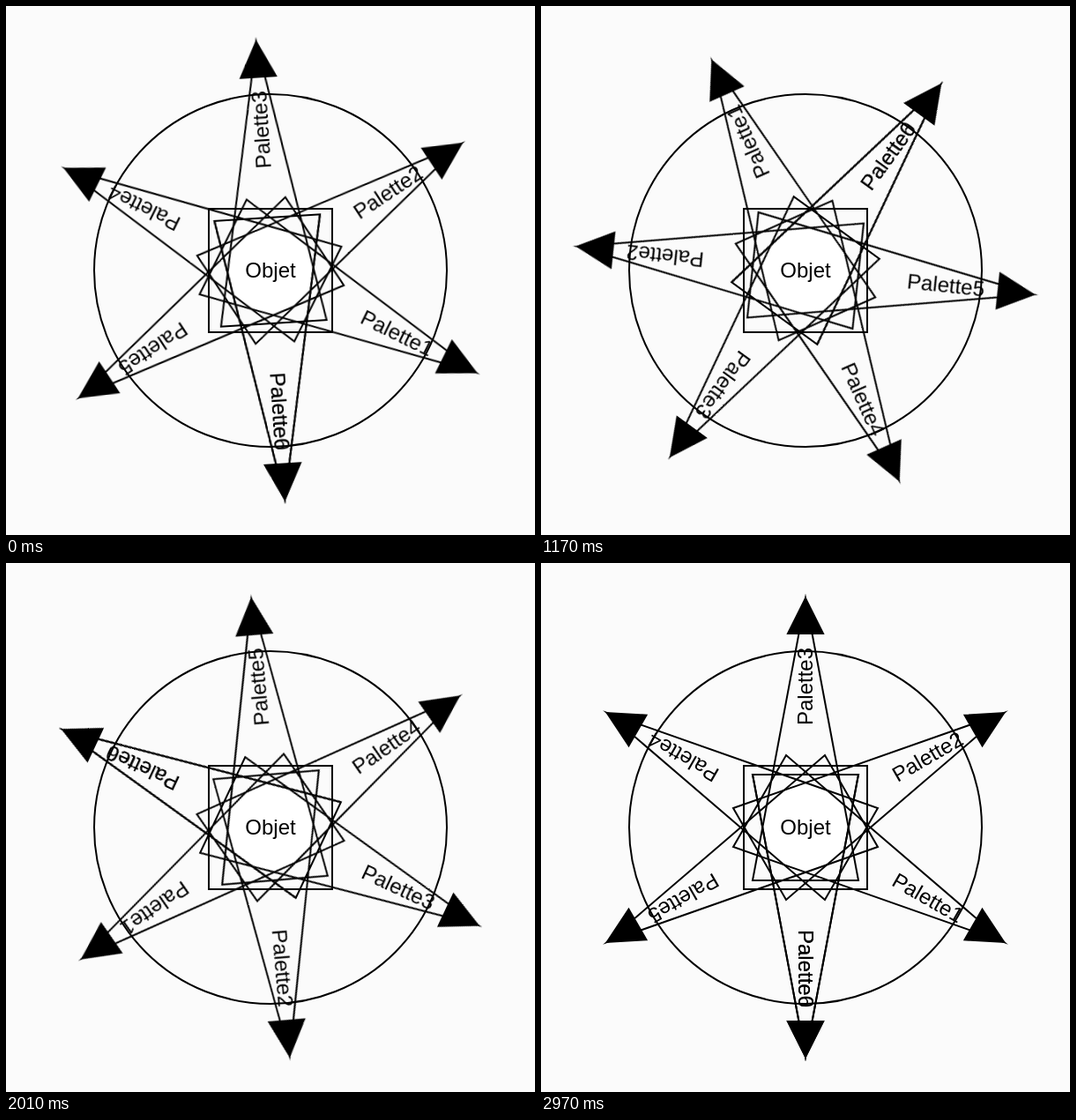
Animation, 600 px wide and 600 px high, one loop 3 s. Source, as an HTML page:

```html
<!DOCTYPE html>
<html lang="fr">
<head>
<meta charset="utf-8">
<title>Palettes</title>
<style>
  html, body { margin: 0; width: 100%; height: 100%; overflow: hidden; background: #fbfbfb; }
  svg { display: block; width: 100vw; height: 100vh; }
  .line { fill: none; stroke: #000; stroke-width: 2; stroke-miterlimit: 10; }
  .head { fill: #000; }
  text { font: 24px "Liberation Sans", Arial, Helvetica, sans-serif; text-anchor: middle; }
  #wheel { transform-origin: 0 0; animation: spin 3s steps(100, start) infinite; }
  @keyframes spin {
    from { transform: rotate(0deg); }
    to { transform: rotate(-360deg); }
  }
</style>
</head>
<body>
<svg viewBox="-300 -300 600 600">
  <defs>
    <g id="arrow">
      <path class="line" d="M-60 -60L260 0L-60 60Z"/>
      <path class="line head" d="M220 -20L260 0L220 20Z"/>
    </g>
  </defs>
  <circle r="48" fill="#fff"/>
  <circle class="line" r="200"/>
  <rect class="line" x="-70" y="-70" width="140" height="140"/>
  <text y="8">Objet</text>
  <g id="wheel"></g>
</svg>
<script>
  // Arms 0 and 6 share a direction, so they overlap.
  const arm = i => `<g transform="rotate(${90 - 60 * i})">
    <use href="#arrow"/><text x="160" y="8">Palette${i}</text></g>`;
  document.getElementById("wheel").innerHTML =
    Array.from({ length: 7 }, (_, i) => arm(i)).join("");
</script>
</body>
</html>
```
